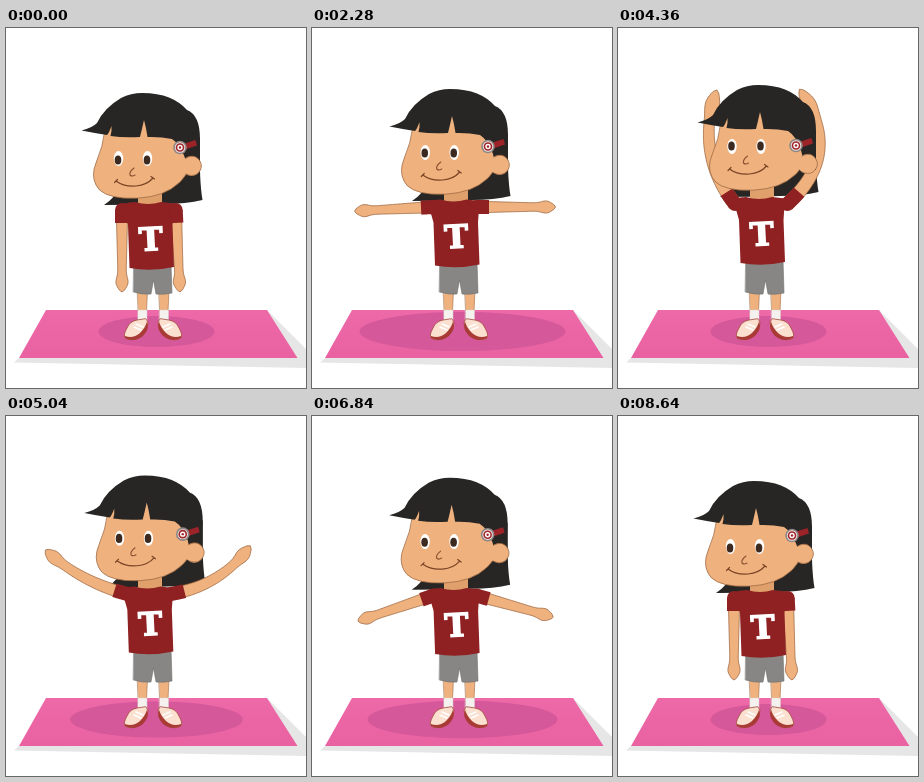
An HTML page with a canvas that plays this animation: 300x360 px, repeating every 8.68 s.

```html
<!DOCTYPE html>
<html lang="en">
<head>
<meta charset="utf-8">
<title>Arm raises</title>
<style>
html, body { margin: 0; width: 100%; height: 100%; overflow: hidden; background: #fff; }
canvas { display: block; width: 300px; height: 360px; }
</style>
</head>
<body>
<canvas id="stage"></canvas>
<script>
const canvas = document.getElementById('stage');
const ctx = canvas.getContext('2d');
const ratio = window.devicePixelRatio || 1;
canvas.width = 300 * ratio;
canvas.height = 360 * ratio;

const LOOP = 8680;
const SKIN = '#efb27e', LINE = '#a06a45', HAIR = '#272624', RED = '#8f2122';

// Time window, start pose, end pose: 0 arms down, 1 sideways, 2 overhead
const MOVES = [[0, 1300, 0, 1], [2350, 3560, 1, 2], [4400, 5500, 2, 1], [6400, 7980, 1, 0]];

function poseAt(t) {
  let pose = 0;
  for (const [from, to, a, b] of MOVES) {
    if (t < from) break;
    const u = Math.min(1, (t - from) / (to - from));
    pose = a + (b - a) * (1 - Math.cos(Math.PI * u)) / 2;
  }
  return pose;
}

function paint(path, fill, stroke, width = 0.8) {
  if (fill) { ctx.fillStyle = fill; ctx.fill(path); }
  if (stroke) { ctx.strokeStyle = stroke; ctx.lineWidth = width; ctx.stroke(path); }
}

const shape = (d, fill, stroke, width) => paint(new Path2D(d), fill, stroke, width);

function oval(x, y, rx, ry, fill) {
  const path = new Path2D();
  path.ellipse(x, y, rx, ry, 0, 0, 7);
  paint(path, fill);
}

function shifted(x, y, draw) {
  ctx.save();
  ctx.translate(x, y);
  draw();
  ctx.restore();
}

function makeArm(side, pose) {
  const out = Math.min(1, pose), up = Math.max(0, pose - 1);
  const angle = (87 * out + 84 * up + (side > 0 ? 3 : 0)) * Math.PI / 180;
  const sin = Math.sin(angle), cos = Math.cos(angle);
  const len = 82 - 2.5 * out + 36 * up;
  const bend = (side < 0 ? 32 : 52) * up;
  const x0 = 143 + side * (27 - 6 * sin), y0 = 182 - 3 * pose;
  // Outline of the curved limb between 0 and end, with half width w(s)
  const outline = (end, w) => {
    const left = [], right = [];
    for (let i = 0; i <= 50; i++) {
      const s = end * i / 50, along = s * len, bow = 2 * s * (1 - s) * bend;
      const slope = bend * (2 - 4 * s), k = w(s) / Math.hypot(len, slope);
      const point = d => {
        const a = along - d * k * slope, o = bow + d * k * len;
        return [x0 + side * (sin * a - cos * o), y0 + cos * a + sin * o];
      };
      left.push(point(1));
      right.unshift(point(-1));
    }
    return new Path2D('M' + left.concat(right).join('L') + 'Z');
  };
  // Tapers to the wrist, widens at the hand, rounds off at the tip
  const limbWidth = s => {
    const w = 5.8 + up - 2.2 * s + 2.2 * Math.exp(-(((s - 0.88) / 0.08) ** 2));
    return w * Math.sqrt(1 - Math.max(0, (s - 0.89) / 0.11) ** 2);
  };
  return { x0, y0, limb: outline(1, limbWidth), sleeve: outline(13 / len, () => 7) };
}

function drawSleeve(arm) {
  paint(arm.sleeve, RED);
  oval(arm.x0, arm.y0, 7, 7, RED);
}

function drawMat(pose) {
  shape('M261 282L300 321V340L8 334.500L13 330Z', '#e6e6e6');
  const pink = ctx.createLinearGradient(0, 282, 0, 330);
  pink.addColorStop(0, '#ed69a8');
  pink.addColorStop(1, '#e961a0');
  shape('M40 282H261L291.500 330L13 330Z', pink);
  const spread = 1 - Math.abs(1 - pose);
  oval(150.500, 303.500, 58 + 45 * spread, 15.500 + 4 * spread, '#d5589a');
}

function drawShoe() {
  shape('M131 292Q124 293 121 300Q117 307 119 310Q126 314 134 309Q142 303 142 294L140 291Z', '#fbdfcf', '#a4473c');
  shape('M119 308Q127 311 134 305Q140 299 141 293Q144 301 137 308Q128 315 119 310Z', '#a83b35');
  shape('M128 299L135 302M130 296L137 299', null, '#fff', 1.500);
}

function drawLegs(lift) {
  for (const x of [131.500, 153]) {
    shape(`M${x} 262H${x + 10}L${x + 9} 284H${x + 1}Z`, SKIN, LINE, 0.6);
    shape(`M${x + 0.500} 282H${x + 9.500}V294H${x + 0.500}Z`, '#f4f1ee', '#d8cfc9', 0.5);
  }
  drawShoe();
  ctx.save();
  ctx.translate(294, 0);
  ctx.scale(-1, 1);
  drawShoe();
  ctx.restore();
  const top = 236 - 5 * lift;
  shape(`M128 ${top}H165L166 265Q157 267 150 266L147.500 252L145 266Q137 267 127.500 264Z`, '#878685', '#706f6e', 0.6);
}

function drawShirt() {
  shape('M116 176Q124 174 129 174Q142 178 155 174L168 175.500L166.500 197L168 239Q145 244 123.500 240L122 197Z', RED);
  ctx.save();
  ctx.translate(145.500, 222.500);
  ctx.rotate(-0.05);
  ctx.font = '700 32px "DejaVu Serif", serif';
  ctx.textAlign = 'center';
  ctx.fillStyle = ctx.strokeStyle = '#fff';
  ctx.lineWidth = 1.500;
  ctx.lineJoin = 'miter';
  ctx.fillText('T', 0, 0);
  ctx.strokeText('T', 0, 0);
  ctx.restore();
}

function drawBackHair() {
  shape('M116 156Q108 171 98 177Q128 177 158 176Q180 176 196.500 172Q193 152 194 110L150 100Z', HAIR);
}

function drawFace(lift) {
  shape('M99 102L106 88H178L181 145Q176 154 165 161Q147 172 117 170Q95 168 90 157Q85 147 90 135Q97 119 99 102Z', SKIN, LINE);
  shifted(-2.5 * lift, -4 * lift, () => {
    for (const x of [112.500, 141.500]) {
      oval(x, 130.500, 4.700, 7.500, '#fff');
      oval(x - 0.500, 132 - 2 * lift, 3.300, 4.600, '#3c2a20');
    }
    shape('M128 140Q123 144 124 147Q126 149 129 147', null, '#8a5130', 1.100);
    shape('M110 153Q118 159 130 158Q141 157 147 150M108.500 154.500L111.500 151.500M145 148.500L148.500 151', null, '#7c4426', 1.200);
  });
}

function drawFrontHair() {
  shape('M75.500 102.500Q86 100 91 95Q98 80 115 70Q125 65 136 65Q152 65 163 69.500Q174 74 181 82Q194 87 194 111V150H184L179 130Q174 116 166 111Q154 108.500 141.500 109Q140 99 138 92Q136 101 134 109Q118 110 104.500 108Q106 103 105.500 98Q103 105 101 107Q88 105 75.500 102.500Z', HAIR);
}

function drawClip() {
  shape('M177 116L189.500 112L191 117.500L179 121.500Z', '#9c2327');
  [[6.8, '#8d8684'], [5.2, '#eee5e2'], [4.3, '#a3262b'], [2.7, '#fff'], [1.2, '#a3262b']]
    .forEach(([r, color]) => oval(174, 119.500, r, r, color));
}

function draw(t) {
  const pose = poseAt(t), lift = pose / 2;
  const hx = 4 * lift, hy = -8 * lift;
  const arms = [makeArm(-1, pose), makeArm(1, pose)];
  ctx.setTransform(ratio, 0, 0, ratio, 0, 0);
  ctx.fillStyle = '#fff';
  ctx.fillRect(0, 0, 300, 360);
  ctx.lineJoin = ctx.lineCap = 'round';

  drawMat(pose);
  shifted(hx, hy, drawBackHair);
  shifted(0, -5 * lift, () => shape('M132 160H156V175Q142 181 132 175Z', '#e0a06c'));
  for (const arm of arms) paint(arm.limb, SKIN, LINE);
  drawLegs(lift);
  shifted(-lift, -5 * lift, drawShirt);
  arms.forEach(drawSleeve);
  shifted(hx, hy, () => {
    drawFace(lift);
    drawFrontHair();
  });
  shifted(hx, -2 * lift, () => {
    oval(185.500, 138, 9.800, 10, SKIN);
    shape('M180 130Q189 125 194 133Q198 140 191 146Q186 149 180 146', null, LINE);
    drawClip();
  });
}

const start = performance.now();
function tick() {
  draw((performance.now() - start) % LOOP);
  requestAnimationFrame(tick);
}
tick();
</script>
</body>
</html>
```
